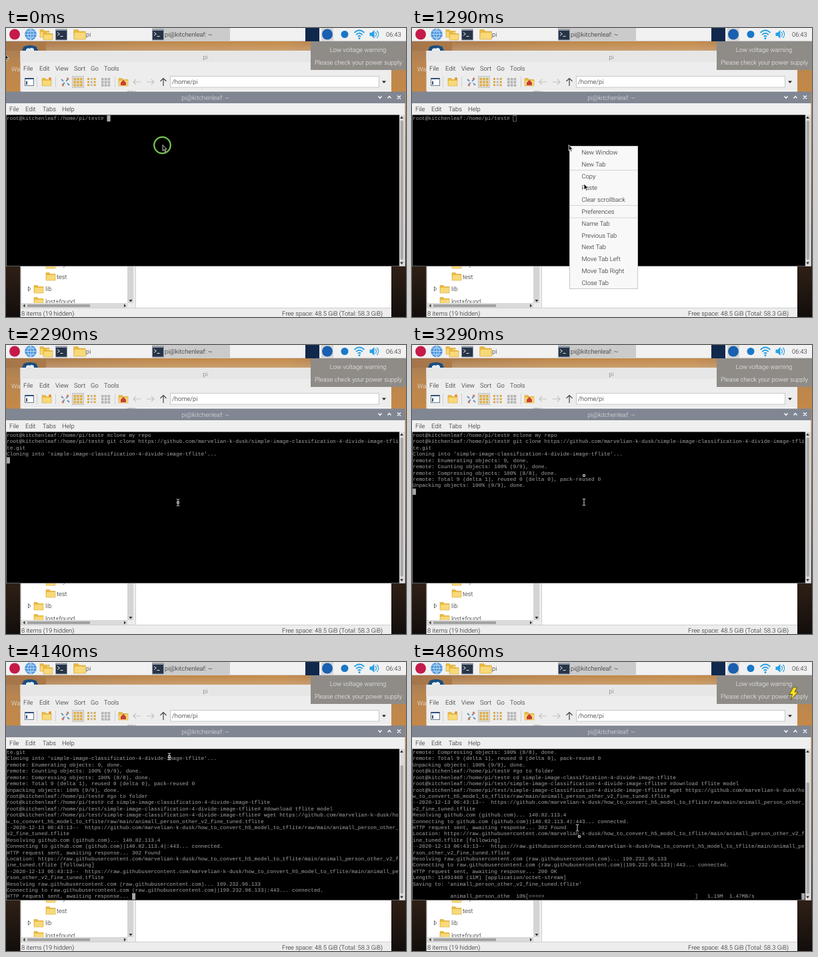
An HTML page for the animation above (5010 ms loop, 600 px wide and 434 px high).

```html
<!DOCTYPE html>
<html lang="en">
<head>
<meta charset="utf-8">
<title>Cloning in a terminal</title>
<style>
html, body { margin: 0; width: 100%; height: 100%; overflow: hidden; background: #000; }
svg { display: block; width: 600px; height: 434px; }
text { font: 300 9.4px Roboto, "Open Sans", sans-serif; fill: #1c1c1c; text-rendering: geometricPrecision; white-space: pre; }
.mid { text-anchor: middle; }
#rows text { font: 13.333px "Liberation Mono", "DejaVu Sans Mono", monospace; fill: #a4a4a4; }
.line { fill: none; stroke: #cfcfcf; stroke-width: 1; }
</style>
</head>
<body>
<svg viewBox="0 0 600 434">
  <defs>
    <linearGradient id="sky" x2="0" y2="1">
      <stop offset="0" stop-color="#94745a"/><stop offset=".12" stop-color="#b98550"/>
      <stop offset=".25" stop-color="#c78a45"/><stop offset=".7" stop-color="#5d3d26"/>
      <stop offset=".83" stop-color="#2e1f16"/><stop offset="1" stop-color="#120e0c"/>
    </linearGradient>
    <linearGradient id="glow">
      <stop offset="0" stop-color="#a5754a"/><stop offset=".35" stop-color="#bd8648"/>
      <stop offset=".7" stop-color="#c58b4a"/><stop offset="1" stop-color="#8b6f58"/>
    </linearGradient>
    <linearGradient id="haze" x2="0" y2="1">
      <stop offset="0" stop-color="#d8c0a6" stop-opacity="0"/><stop offset="1" stop-color="#d8c0a6" stop-opacity=".4"/>
    </linearGradient>
    <g id="folder">
      <path d="M-7-5.5h5l1.5 2H7V6H-7z" fill="#e9b93d"/>
      <path d="M-6-2H7V6H-7z" fill="#f8d978"/>
      <path d="M-7-5.5h5l1.5 2H7V6H-7z" fill="none" stroke="#d8aa40" stroke-width=".6"/>
    </g>
    <g id="shell">
      <rect x="-9" y="-8" width="18" height="17" rx="1" fill="#8e97a5"/>
      <rect x="-8" y="-5.5" width="16" height="13.5" fill="#273447"/>
      <path d="M-6-3l3.4 2.5L-6 2M-1.5 3h4" fill="none" stroke="#e8edf2"/>
    </g>
    <path id="arrow" d="M0 0V8.8L2 7l1.5 3.3 1.5-.7-1.5-3.1h2.8z" fill="#111" stroke="#eee" stroke-width=".8"/>
    <path id="beam" d="M-2.2-5Q0-5 0-4 0-5 2.2-5M0-4V4M-2.2 5Q0 5 0 4 0 5 2.2 5" fill="none" stroke="#ddd"/>
    <path id="hand" d="M-.8-4Q0-5 .8-4V-1l2.500.8v3L2.200 5H-1.700L-3.400 1.700l.9-.8 1.700 1.400z" fill="#f0f0f0" stroke="#222" stroke-width=".5"/>
  </defs>

  <rect width="600" height="434" fill="url(#sky)"/>
  <rect y="20" width="600" height="14" fill="url(#glow)"/>
  <rect x="60" y="20" width="400" height="14" fill="url(#haze)"/>
  <path d="M24 34l2.500-6q9.500-4 19 0l2.500 6z" fill="#194d80"/>
  <path d="M30 32q3-3 6-1 3-3 6 1v2H30z" fill="#e6edf3"/>
  <text x="8" y="65" style="fill:#eee">Wa</text>

  <g id="files">
    <rect x="21.500" y="34" width="556.500" height="400" fill="#ededed"/>
    <rect x="21.500" y="34" width="556.500" height="17" fill="#e6e6e6"/>
    <text class="mid" x="299" y="47" style="fill:#777">pi</text>
    <path class="line" d="M46.500 73v16M74.500 73v16M163.500 73v16"/>
    <g transform="translate(35 81)">
      <rect x="-6.500" y="-5.500" width="13" height="11" fill="#fff" stroke="#6b7c90"/>
      <path d="M-6.500-5H6.500M-4-1V4" stroke="#2f4f7c" stroke-width="2"/>
    </g>
    <use href="#folder" x="61" y="81"/>
    <circle cx="66" cy="76" r="2" fill="#e98b2a"/>
    <path d="M83 77l3 3M92 83l3 3M94 76l-4 4M88 82l-4 4" stroke="#6a90b8" stroke-width="1.800"/>
    <path d="M84 86h3M91 76h3" stroke="#dd7a55" stroke-width="2.500"/>
    <rect x="99.500" y="72.500" width="17" height="17" fill="#ddd" stroke="#c4c4c4"/>
    <g id="views"></g>
    <use href="#folder" x="176" y="81"/>
    <path d="M172 82l4-4 4 4v4h-8z" fill="#c63f35"/>
    <path d="M202 81h-11M195 77l-4 4 4 4M211 81h11M218 77l4 4-4 4" fill="none" stroke="#c2c2c2" stroke-width="1.200"/>
    <path d="M236 87V76M231.500 80l4.500-4.500 4.500 4.500" fill="none" stroke="#444" stroke-width="1.200"/>
    <rect x="246.500" y="72.500" width="313" height="16.500" fill="#fff" stroke="#c8c8c8"/>
    <text x="249" y="84">/home/pi</text>
    <path d="M564 79.500h6l-3 3.500z" fill="#222"/>
    <rect x="23" y="94" width="159" height="319" fill="#fff"/>
    <rect x="195" y="94" width="383" height="326" fill="#fff"/>
    <path class="line" d="M194.500 94V420M22 420.500H578M22.500 94V420"/>
    <rect x="182" y="94" width="9" height="319" fill="#d4d4d4"/>
    <path d="M184.500 408h5l-2.500 3.500z" fill="#333"/>
    <rect x="23" y="413" width="159" height="7" fill="#dadada"/>
    <rect x="32" y="415" width="94" height="4" fill="#a2a2a2"/>
    <path d="M28.500 414.500v5l-3-2.500zM177 414.500v5l3-2.500z" fill="#333"/>
    <use href="#folder" x="67" y="355"/>
    <text x="77" y="358">my</text>
    <use href="#folder" x="67" y="373"/>
    <text x="76" y="376.500">test</text>
    <path d="M33.500 388.500v6.500l3.500-3.200z" fill="#fff" stroke="#444" stroke-width=".8"/>
    <use href="#folder" x="49" y="392"/>
    <text x="59" y="395">lib</text>
    <svg x="23" y="400" width="159" height="13" viewBox="23 400 159 13">
      <use href="#folder" x="49" y="410"/>
      <text x="59" y="413.500">lost+found</text>
    </svg>
    <text x="23" y="432">8 items (19 hidden)</text>
    <text x="414" y="432">Free space: 48.5 GiB (Total: 58.3 GiB)</text>
  </g>

  <g id="terminal">
    <rect y="95.500" width="599" height="262.500" fill="#808692"/>
    <text class="mid" x="299" y="107.500" style="fill:#e3e5e8">pi@kitchenleaf: ~</text>
    <path d="M558.500 102.500l2.500 3 2.500-3M572.500 105.500l2.500-3 2.500 3M587 101.500l5 5M592 101.500l-5 5" fill="none" stroke="#fff" stroke-width="1.300"/>
    <rect y="113" width="598.500" height="244.500" fill="#efefef"/>
    <rect x=".5" y="130.500" width="589.500" height="227" fill="#000"/>
    <rect x="590" y="130.500" width="8" height="227" fill="#dadada"/>
    <rect id="thumb" x="591.500" width="4.500" rx="2" fill="#a9a9a9"/>
    <path d="M591 136h5l-2.500-3.500zM591 351.500h5l-2.500 3.500z" fill="#333"/>
    <g id="rows" transform="translate(1 131) scale(.588)">
      <rect id="caret" width="7.500" height="15" fill="#aaa" stroke="#aaa"/>
    </g>
    <path id="link" d="M199 149.500H284" stroke="#aaa" stroke-width=".8"/>
  </g>

  <rect x="457" y="19" width="143" height="44" fill="#8f8c88"/>
  <text class="mid" x="528" y="36" style="fill:#f4f4f4">Low voltage warning</text>
  <text class="mid" x="528.500" y="55" style="fill:#f4f4f4">Please check your power supply</text>
  <path id="bolt" d="M572 38l-6 10.500h4.500L568 57l11-12h-5l3.500-7z" fill="#ffe11a" stroke="#4a4214" stroke-width=".8"/>

  <g id="panel">
    <rect width="600" height="19.500" fill="#f1f1f1"/>
    <path d="M0 19.500H600" stroke="#d2d2d2"/>
    <circle cx="13" cy="9.500" r="8" fill="#c51a4a"/>
    <circle cx="37" cy="9.500" r="8.800" fill="#4b94dc"/>
    <path d="M28.500 9.500h17M37 1v17M30 5h14M30 14h14M37 1q-9 8 0 17M37 1q9 8 0 17" fill="none" stroke="#d8ebfa" stroke-width=".8"/>
    <use href="#folder" x="58" y="8"/>
    <use href="#folder" x="63" y="12"/>
    <use href="#shell" x="83" y="9.500"/>
    <use href="#folder" transform="translate(110.500 9.500) scale(1.250)"/>
    <text x="120" y="13">pi</text>
    <rect x="219" width="117" height="19.500" fill="#cbcbcb"/>
    <use href="#shell" x="228" y="9.500"/>
    <text x="238" y="13">pi@kitchenleaf: ~</text>
    <rect x="449" width="21" height="20" fill="#10284c"/>
    <rect x="473" width="18" height="19.500" fill="#d6d6d6"/>
    <circle cx="482" cy="9.500" r="8" fill="#1a5fb0"/>
    <circle cx="508" cy="9.500" r="5.500" fill="#1a78c8"/>
    <g fill="none" stroke="#28a0e6" stroke-width="1.800">
      <path d="M522.500 7q7.500-7 15 0M525.200 10q4.800-4.500 9.600 0M527.800 12.800q2.200-2 4.400 0"/>
      <path d="M554 6q3 3.500 0 7M556.500 4q4.500 5.500 0 11" stroke-width="1.200"/>
    </g>
    <circle cx="530" cy="15.500" r="1.500" fill="#28a0e6"/>
    <path d="M545.500 7h3l4-4v13l-4-4h-3z" fill="#28a0e6"/>
    <text x="570" y="13">06:43</text>
  </g>

  <g id="menu">
    <rect x="236.500" y="177.500" width="102" height="214" fill="#f8f8f8" stroke="#c8c8c8"/>
    <path d="M237 213.500H338M237 266.500H338M237 285H338" stroke="#d5d5d5"/>
  </g>
  <g id="ring" fill="none">
    <circle cx="234.500" cy="176" r="12.300" stroke="#55a630" stroke-width="2.400"/>
    <circle cx="234.500" cy="176" r="12.300" stroke="#a8d88a" stroke-width=".8"/>
  </g>
  <use id="edge" href="#arrow" x="-2" y="39"/>
  <use id="ghost" href="#arrow" x="235" y="175.500"/>
  <use id="pointer"/>
  <rect id="dot" x="-1.300" y="-1.300" width="2.600" height="2.600" fill="#000" stroke="#fff" stroke-width=".9"/>
</svg>
<script>
const NS = "http://www.w3.org/2000/svg";
const LOOP = 5010, RATE = 7, COLS = 125, ROWS = 24;
const $ = id => document.getElementById(id);

function add(parent, tag, attrs, text = "") {
  const el = document.createElementNS(NS, tag);
  for (const k in attrs) el.setAttribute(k, attrs[k]);
  el.textContent = text;
  return parent.appendChild(el);
}
const show = (id, on) => $(id).setAttribute("visibility", on ? "visible" : "hidden");

// Menu bars, context menu and view icons
const label = (parent, x, y, text) => add(parent, "text", { x, y }, text);
["File", "Edit", "View", "Sort", "Go", "Tools"].forEach((s, i) =>
  label($("files"), [26, 50, 74, 102, 127, 147][i], 63.5, s));
["File", "Edit", "Tabs", "Help"].forEach((s, i) =>
  label($("terminal"), [5, 29, 55, 84][i], 124.5, s));
["New Window", "New Tab", "Copy", "Paste", "Clear scrollback", "Preferences", "Name Tab",
 "Previous Tab", "Next Tab", "Move Tab Left", "Move Tab Right", "Close Tab"].forEach((s, i) =>
  label($("menu"), 254.5, 190 + i * 17.8, s));
for (let r = 0; r < 3; r++) {
  const y = 75 + r * 4.6;
  for (let c = 0; c < 3; c++) {
    add($("views"), "rect", { x: 101.5 + c * 4.8, y, width: 3.4, height: 3.4, fill: "#e2ad3c" });
    add($("views"), "rect", { x: 122 + c * 4.8, y, width: 3, height: 3, fill: c === 1 ? "#bbb" : "#dca83d" });
    add($("views"), "rect", { x: 143 + c * 4.8, y, width: 3.6, height: 3.6, fill: "#b4b4b4" });
  }
}

// Terminal output: [tick, appended text]
const repo = "simple-image-classification-4-divide-image-tflite";
const user = "marvelian-k-dusk";
const home = "root@kitchenleaf:/home/pi/test";
const model = "animall_person_other_v2_fine_tuned.tflite";
const project = user + "/how_to_convert_h5_model_to_tflite";
const source = `https://github.com/${project}/raw/main/${model}`;
const rawUrl = `https://raw.githubusercontent.com/${project}/main/${model}`;
const stamp = "--2020-12-13 06:43:13--  ";
const waiting = "HTTP request sent, awaiting response... ";
const log = [
  [0, `${home}# `],
  [11, `#clone my repo\n${home}# git clone https://github.com/${user}/${repo}.git\n`],
  [13, `Cloning into '${repo}'...\n`],
  [18, "remote: Enumerating objects: 9, done.\n"],
  [19, "remote: Counting objects: 100% (9/9), done.\nremote: Compressing objects: 100% (8/8), done.\n"],
  [21, "remote: Total 9 (delta 1), reused 0 (delta 0), pack-reused 0\n"],
  [22, "Unpacking objects: 100% (9/9), done.\n"],
  [24, `${home}# #go to folder\n${home}# cd ${repo}\n${home}/${repo}# #download tflite model\n` +
       `${home}/${repo}# wget ${source}\n`],
  [25, `${stamp}${source}\nResolving github.com (github.com)... 140.82.113.4\n`],
  [26, `Connecting to github.com (github.com)|140.82.113.4|:443... connected.\n${waiting}`],
  [28, `302 Found\nLocation: ${rawUrl} [following]\n${stamp}${rawUrl}\n` +
       "Resolving raw.githubusercontent.com (raw.githubusercontent.com)... 199.232.96.133\n"],
  [29, "Connecting to raw.githubusercontent.com (raw.githubusercontent.com)|199.232.96.133|:443... connected.\n" + waiting],
  [31, `200 OK\nLength: 11491468 (11M) [application/octet-stream]\nSaving to: ‘${model}’\n\n`]
];

function progress(tick) {
  const pct = [0, 2, 6, 10][tick - 31];
  const bar = pct ? "=".repeat(Math.max(0, Math.floor(pct * .53) - 1)) + ">" : "";
  const size = (pct * .119).toFixed(2) + "M";
  return " ".repeat(12) + "animall_person_othe" + (pct + "%").padStart(5) +
    "[" + bar.padEnd(53) + "]   " + size + "  1.47MB/s";
}

function output(tick) {
  let out = log.filter(e => e[0] <= tick).map(e => e[1]).join("");
  if (tick >= 31) out += progress(tick).padEnd(COLS - 1);
  return out.split("\n").flatMap(s => s.match(new RegExp(`.{1,${COLS}}`, "g")) || [""]);
}

const rows = Array.from({ length: ROWS }, (_, i) => add($("rows"), "text", { x: 0, y: 12 + 16 * i }));

// Waypoints: [tick, x, y]
const localPath = [[2, 235, 175.5], [8, 258, 234], [10, 258, 234], [11, 258, 237], [22, 258, 236],
  [23, 258, 196], [24, 253, 168], [26, 246, 144], [29, 245, 142], [31, 245, 150], [34, 251, 262]];
const remotePath = [[11, 258, 237], [23, 258, 236], [24, 257, 200], [26, 246, 153],
  [29, 245, 142], [31, 245, 146], [34, 248, 249]];

function along(path, tick) {
  const i = path.findIndex(p => p[0] >= tick);
  if (i <= 0) return path[0].slice(1);
  const a = path[i - 1], b = path[i], k = (tick - a[0]) / (b[0] - a[0]);
  return [a[1] + (b[1] - a[1]) * k, a[2] + (b[2] - a[2]) * k];
}
const move = (id, [x, y]) => $(id).setAttribute("transform", `translate(${x} ${y})`);

function scrollThumb(total) {
  const track = 209, height = track * Math.min(1, ROWS / total);
  $("thumb").setAttribute("y", 139 + track - height);
  $("thumb").setAttribute("height", height);
}

function draw(tick) {
  const all = output(tick), lines = all.slice(-ROWS);
  rows.forEach((r, i) => { r.textContent = lines[i] || ""; });
  scrollThumb(all.length);

  const menu = tick >= 2 && tick < 11, pasted = tick >= 11;
  const caret = $("caret");
  caret.setAttribute("x", lines[lines.length - 1].length * 8 + .5);
  caret.setAttribute("y", (lines.length - 1) * 16 + .5);
  caret.setAttribute("fill", menu ? "none" : "#aaa");

  const hover = tick >= 25 && tick < 28;
  show("menu", menu);
  show("ghost", menu);
  show("ring", tick < 2);
  show("edge", tick < 1);
  show("link", hover);
  show("dot", pasted);
  show("bolt", tick >= 33);
  $("pointer").setAttribute("href", hover ? "#hand" : pasted ? "#beam" : "#arrow");
  move("pointer", along(pasted ? remotePath : localPath, tick));
  move("dot", along(localPath, tick));
}

let last = -1;
function loop() {
  const t = performance.now() % LOOP;
  const tick = Math.min(34, Math.floor((t + 5) * RATE / 1000));
  if (tick !== last) draw(last = tick);
  requestAnimationFrame(loop);
}
loop();
</script>
</body>
</html>
```
